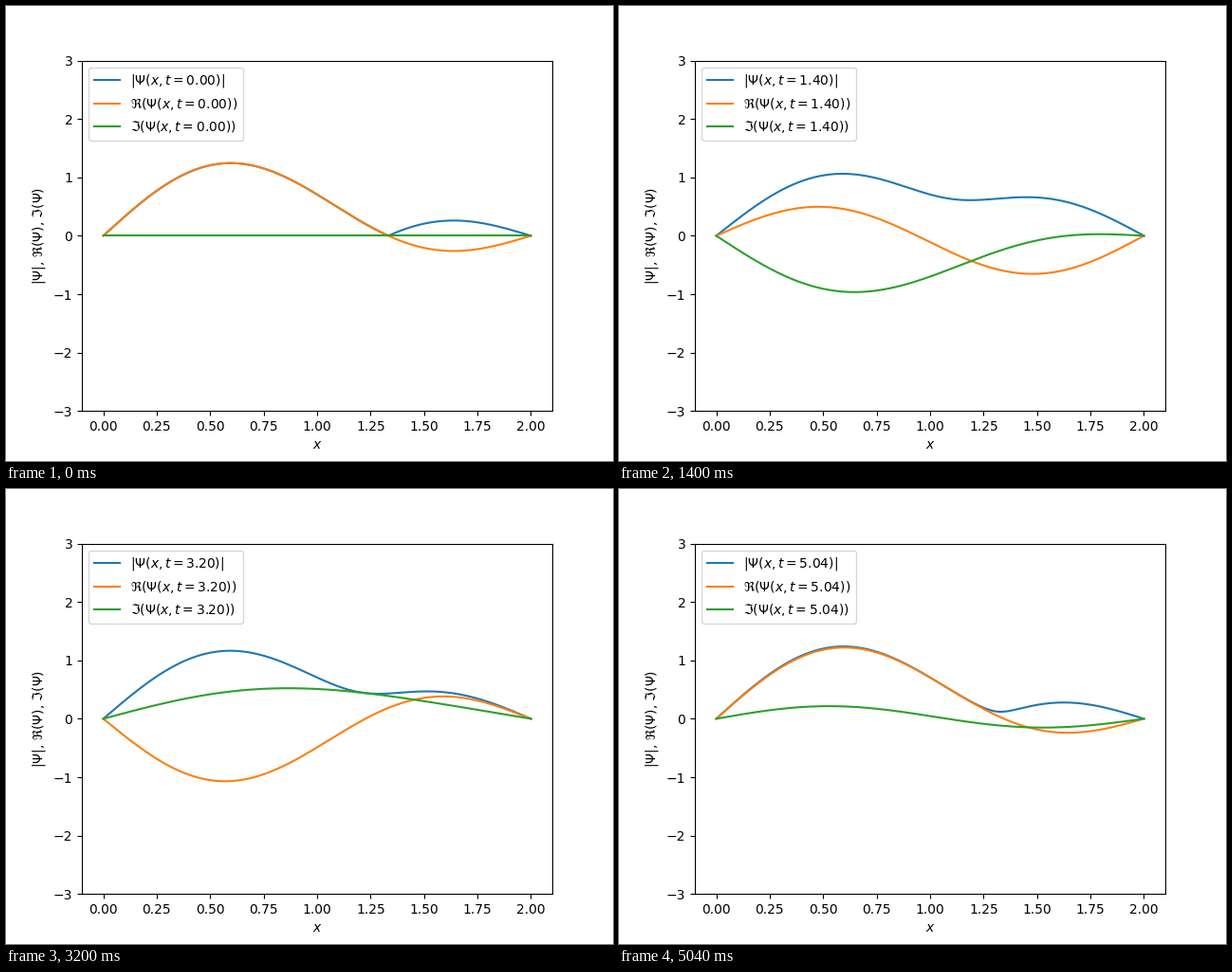
A matplotlib script that plays this animation: 640 by 480 pixels, repeating every 5080 ms.

```python
import numpy as np
import matplotlib.pyplot as plt
from matplotlib.animation import FuncAnimation

L = 2.0            # width of the well
FRAMES = 127
INTERVAL = 40      # ms
DT = INTERVAL / 1000

x = np.linspace(0, L, 500)


def eigenstate(n, t):
    """Stationary state n of the infinite well, with hbar = m = 1."""
    energy = (n * np.pi / L) ** 2 / 2
    return np.sqrt(2 / L) * np.sin(n * np.pi * x / L) * np.exp(-1j * energy * t)


def wave(t):
    return (eigenstate(1, t) + eigenstate(2, t)) / np.sqrt(2)


PARTS = [
    (np.abs, r"$|\Psi(x,t={:.2f})|$"),
    (np.real, r"$\Re(\Psi(x,t={:.2f}))$"),
    (np.imag, r"$\Im(\Psi(x,t={:.2f}))$"),
]

fig, ax = plt.subplots(figsize=(6.4, 4.8), dpi=100)
lines = [ax.plot(x, part(wave(0)), label=label.format(0))[0]
         for part, label in PARTS]
ax.set_xlim(-0.05 * L, 1.05 * L)
ax.set_ylim(-3, 3)
ax.set_xlabel(r"$x$")
ax.set_ylabel(r"$|\Psi|$, $\Re(\Psi)$, $\Im(\Psi)$")
legend = ax.legend(loc="upper left")


def update(i):
    t = i * DT
    psi = wave(t)
    for line, text, (part, label) in zip(lines, legend.get_texts(), PARTS):
        line.set_ydata(part(psi))
        text.set_text(label.format(t))
    return [*lines, legend]


anim = FuncAnimation(fig, update, frames=FRAMES, interval=INTERVAL,
                     repeat=True, repeat_delay=0)
plt.show()
```
